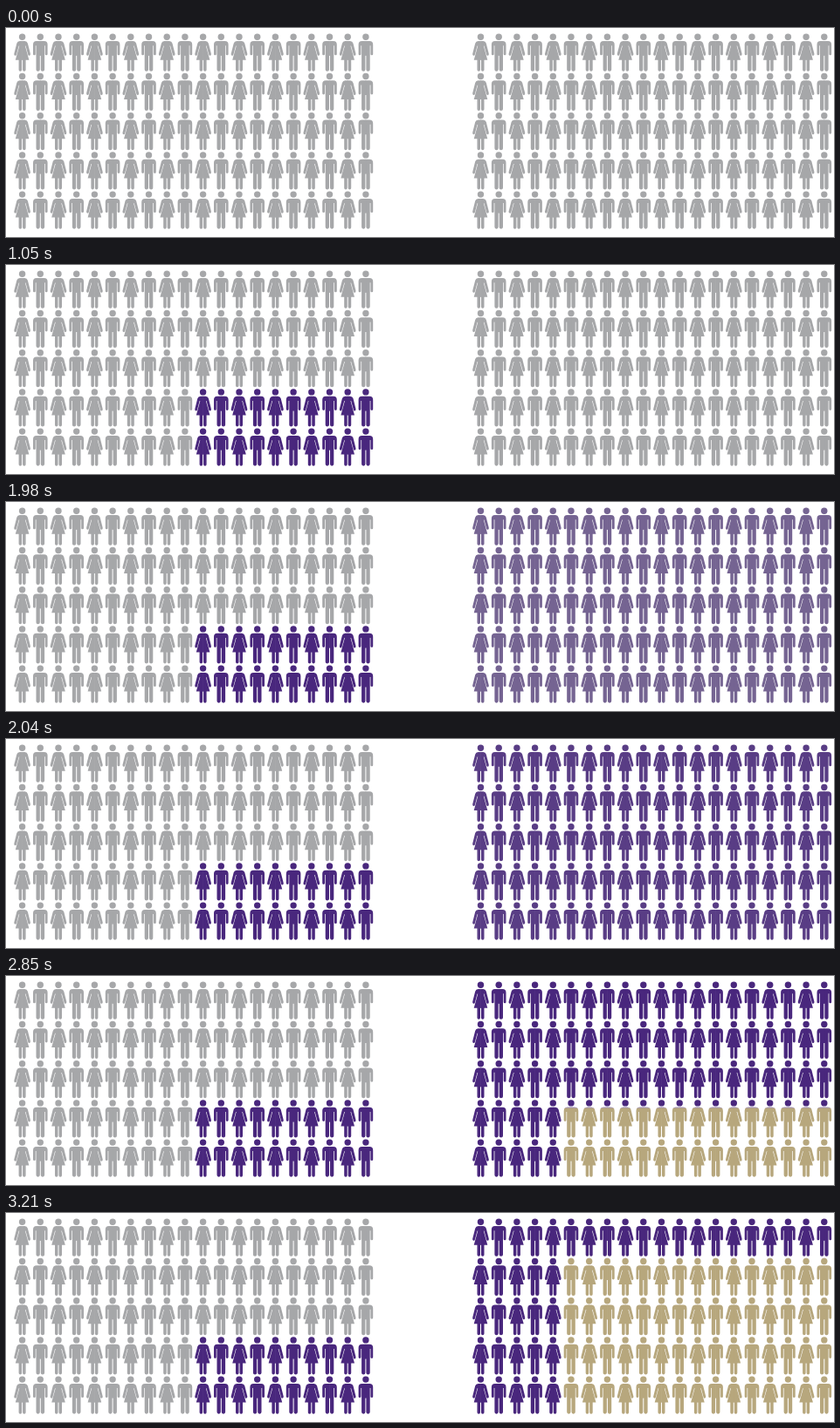
Write an HTML page that moves like this. It is 948 px wide and 240 px high and loops after 3240 ms.

```html
<!DOCTYPE html>
<html lang="en">
<head>
<meta charset="utf-8">
<title>People chart</title>
<style>
html, body { margin: 0; width: 100%; height: 100%; overflow: hidden; background: #fff; }
svg { display: block; width: 948px; height: 240px; }
</style>
</head>
<body>
<svg id="stage" viewBox="0 0 948 240" xmlns="http://www.w3.org/2000/svg">
  <defs>
    <path id="halfMan" d="M-.3 4.8H4.4Q8.3 4.8 8.3 8.8V19.6A1.4 1.4 0 0 1 5.5 19.6V10H4.8V37.5A2.1 2 0 0 1 .5 37.5V21.5H-.3Z"/>
    <path id="halfWoman" d="M-.3 4.8H2.8Q5.6 4.8 6.3 7.4L9.3 19.3Q9.6 21.1 8.3 21.5Q7 21.8 6.6 20.3L3.9 10.2H3.3L7.8 26.5H4V37.8A1.7 1.7 0 0 1 .5 37.8V26.5H-.3Z"/>
    <g id="man"><circle r="3.7"/><use href="#halfMan"/><use href="#halfMan" transform="scale(-1 1)"/></g>
    <g id="woman"><circle r="3.7"/><use href="#halfWoman"/><use href="#halfWoman" transform="scale(-1 1)"/></g>
  </defs>
</svg>
<script>
const NS = 'http://www.w3.org/2000/svg';
const LOOP = 3240, STEP = 30;
const COLS = 20, ROWS = 5, DX = 20.7, DY = 45.2, TOP = 10.3, BOTTOM = 231;
const LEFT = 18.6, RIGHT = 543.5;
const GREY = [166, 167, 169], PURPLE = [73, 39, 125], GOLD = [183, 167, 125];
const stage = document.getElementById('stage');

const rgb = c => `rgb(${c.map(Math.round).join(',')})`;
const mix = (a, b, p) => a.map((v, i) => v + (b[i] - v) * p);
const ramp = (t, from, to) => Math.min(1, Math.max(0, (t - from) / (to - from)));

function add(parent, tag, attrs) {
  const el = document.createElementNS(NS, tag);
  for (const k in attrs) el.setAttribute(k, attrs[k]);
  parent.appendChild(el);
  return el;
}

function crowd(parent, x, col0, row0, color) {
  const g = add(parent, 'g', { fill: rgb(color) });
  for (let r = row0; r < ROWS; r++)
    for (let c = col0; c < COLS; c++)
      add(g, 'use', { href: c % 2 ? '#man' : '#woman', x: x + c * DX, y: TOP + r * DY });
  return g;
}

// Recoloured corner of a block, revealed from the bottom up
function wipe(id, x, col0, row0, color) {
  const box = { x: x + (col0 - .5) * DX, width: (COLS - col0) * DX };
  const top = TOP + row0 * DY - 4;
  const clip = add(add(stage, 'clipPath', { id }), 'rect', box);
  const g = add(stage, 'g', { 'clip-path': `url(#${id})` });
  add(g, 'rect', { ...box, y: top, height: BOTTOM - top, fill: '#fff' });
  crowd(g, x, col0, row0, color);
  return p => {
    const h = (BOTTOM - top) * p;
    clip.setAttribute('y', BOTTOM - h);
    clip.setAttribute('height', h);
  };
}

crowd(stage, LEFT, 0, 0, GREY);
const rightCrowd = crowd(stage, RIGHT, 0, 0, GREY);
const purpleWipe = wipe('purpleClip', LEFT, 10, 3, PURPLE);
const goldWipe = wipe('goldClip', RIGHT, 5, 1, GOLD);

function draw(ms) {
  const t = Math.floor(ms % LOOP / STEP) * STEP;
  purpleWipe(ramp(t, 600, 1040));
  rightCrowd.setAttribute('fill', rgb(mix(GREY, PURPLE, ramp(t, 1875, 2075))));
  goldWipe(ramp(t, 2580, 3190));
}

const start = performance.now();
function tick() {
  draw(performance.now() - start);
  requestAnimationFrame(tick);
}
tick();
</script>
</body>
</html>
```
